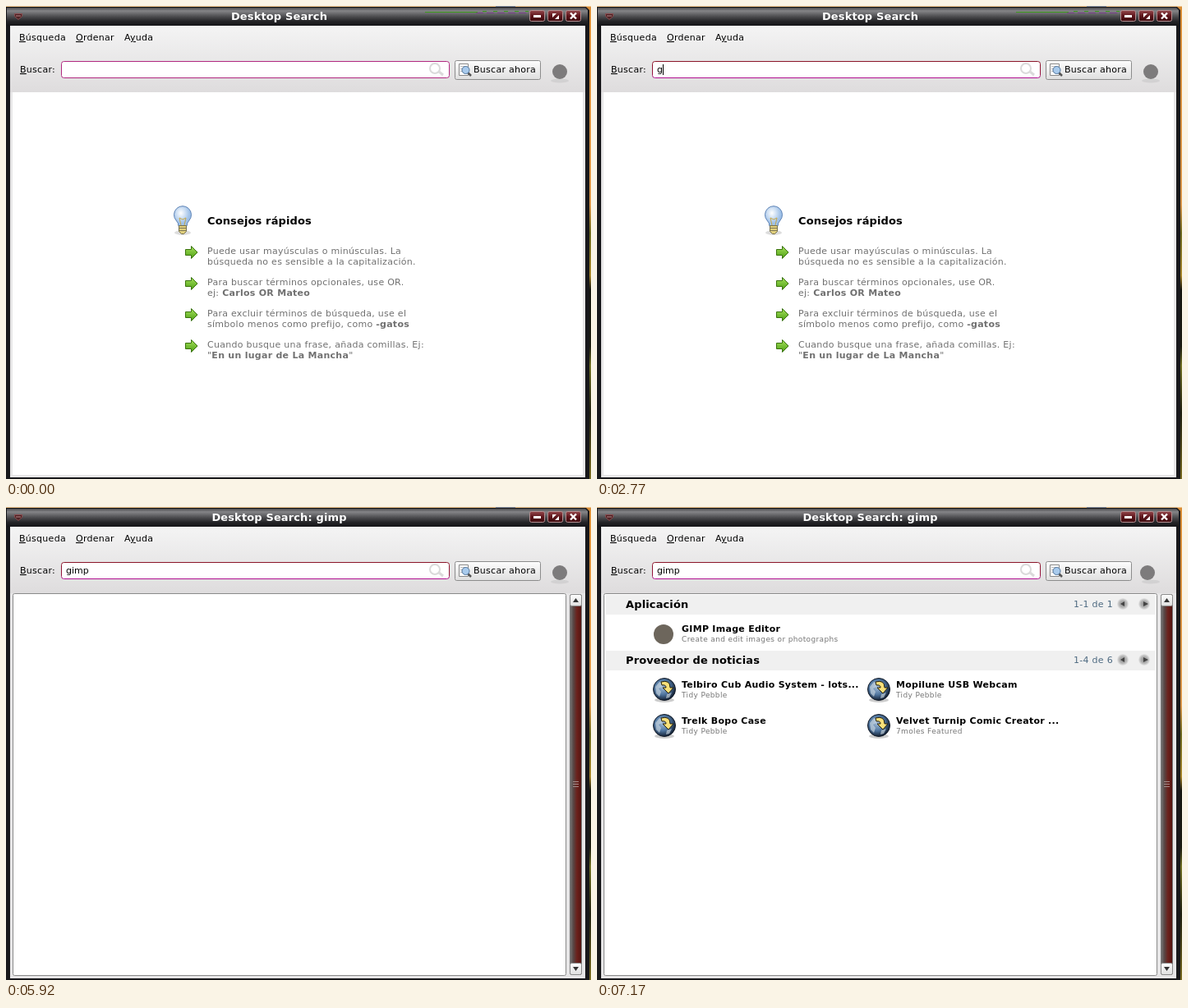
These frames come from a looping animation (712x576 px, 8000 ms). An HTML page:

```html
<!DOCTYPE html>
<html lang="es">
<head>
<meta charset="utf-8">
<title>Desktop Search</title>
<style>
  html, body { margin: 0; width: 100%; height: 100%; overflow: hidden; background: #fff; }
  svg { display: block; }
  text { font: 11px "DejaVu Sans", sans-serif; letter-spacing: .025em; fill: #000; }
  .bold, .bold text { font-weight: bold; }
  .head { font-size: 13px; font-weight: bold; letter-spacing: .01em; }
  .tips text { fill: #707070; }
  .small { font-size: 9px; letter-spacing: .04em; fill: #777; }
  .count { fill: #4d6980; }
  .title { fill: #fff; text-anchor: middle; }
  .key { text-decoration: underline; text-decoration-skip-ink: none; text-underline-offset: 2px; }
  #query { letter-spacing: 0; }
</style>
</head>
<body>
<svg width="712" height="576" viewBox="0 0 712 576">
  <defs>
    <linearGradient id="bar" x2="0" y2="1">
      <stop stop-color="#4a4a4d"/><stop offset=".18" stop-color="#858588"/>
      <stop offset=".5" stop-color="#4b4b4e"/><stop offset=".75" stop-color="#252528"/><stop offset="1" stop-color="#151518"/>
    </linearGradient>
    <linearGradient id="tool" x2="0" y2="1"><stop stop-color="#f4f4f4"/><stop offset="1" stop-color="#dedcdd"/></linearGradient>
    <linearGradient id="button" x2="0" y2="1"><stop stop-color="#fdfdfd"/><stop offset="1" stop-color="#dfdfdf"/></linearGradient>
    <linearGradient id="ruby" x2="0" y2="1"><stop stop-color="#94484c"/><stop offset=".5" stop-color="#5e151b"/><stop offset="1" stop-color="#3c0a0e"/></linearGradient>
    <linearGradient id="focus" x2="0" y2="1"><stop stop-color="#8a1428"/><stop offset=".75" stop-color="#94143c"/><stop offset="1" stop-color="#b01090"/></linearGradient>
    <linearGradient id="wall" x2="0" y2="1">
      <stop stop-color="#d98d35"/><stop offset=".42" stop-color="#d9964a"/><stop offset=".48" stop-color="#6d6a20"/>
      <stop offset=".57" stop-color="#a8862c"/><stop offset=".6" stop-color="#15150d"/><stop offset=".72" stop-color="#1c1c10"/>
      <stop offset=".76" stop-color="#747326"/><stop offset=".86" stop-color="#20200f"/><stop offset="1" stop-color="#7a6c22"/>
    </linearGradient>
    <linearGradient id="thumb"><stop stop-color="#777"/><stop offset=".3" stop-color="#574543"/><stop offset=".6" stop-color="#6c211c"/><stop offset="1" stop-color="#501410"/></linearGradient>
    <linearGradient id="leaf" x2="0" y2="1"><stop stop-color="#a3e05a"/><stop offset="1" stop-color="#4fa015"/></linearGradient>
    <radialGradient id="glass" cx=".4" cy=".35"><stop stop-color="#fff"/><stop offset="1" stop-color="#9fc1e8"/></radialGradient>
    <radialGradient id="sea" cx=".42" cy=".4" r=".62"><stop stop-color="#a3bdd8"/><stop offset=".55" stop-color="#4f759f"/><stop offset="1" stop-color="#101c2e"/></radialGradient>
    <radialGradient id="disc"><stop stop-color="#8c8c8c"/><stop offset=".6" stop-color="#b4b4b4"/><stop offset="1" stop-color="#e6e6e6"/></radialGradient>

    <path id="arrow" d="M.5 4.5h7v-4l7.5 7.5-7.5 7.5v-4h-7z" fill="url(#leaf)" stroke="#39720c"/>
    <g id="globe">
      <ellipse cy="13" rx="12" ry="3" fill="#0003"/>
      <circle r="13.5" fill="url(#sea)" stroke="#121a26"/>
      <path d="M-11-3l5-6 5 1-2 5-4 2 3 4-2 6-4-4zM3 6l6-2-3 6-4 1z" fill="#cdd8e2" opacity=".65"/>
      <path d="M-4-9q11-3 11 7h4L5 5-2-2h4q0-4-5-3z" fill="#f8e07a" stroke="#241e08"/>
    </g>
    <g id="pager">
      <circle cx="640" r="7" fill="url(#disc)"/><path d="M642-3v6l-5-3z" fill="#444"/>
      <circle cx="666" r="7" fill="url(#disc)"/><path d="M665-3v6l6-3z" fill="#444"/>
    </g>
    <rect id="band" x="11" y="107" width="668" height="24" fill="#f0f0f0"/>
    <rect id="winbutton" x=".5" y=".5" width="18" height="13" rx="2" fill="url(#ruby)" stroke="#b48e90"/>
    <rect id="step" x="686.500" y=".5" width="14" height="14" rx="2" fill="url(#button)" stroke="#8b8b8b"/>
  </defs>

  <!-- window frame -->
  <rect width="712" height="576" fill="url(#wall)"/>
  <path d="M0 .5H712" stroke="#efc58e"/>
  <path d="M0 1H706l4 4V576H0z" fill="#18181b"/>
  <path d="M1 2H705l3 3V24H1z" fill="url(#bar)"/>
  <path d="M0 1.500H596" stroke="#111"/>
  <path d="M596 .5h24" stroke="#8890a0"/>
  <g data-show="0-5340">
    <path d="M510 7.500h64" stroke="#3d9a1c"/>
    <path d="M572 8.500h64" stroke="#7b3f8c" stroke-dasharray="9 4"/>
    <path d="M580 6.500h56" stroke="#3d9a1c" stroke-dasharray="5 8"/>
  </g>
  <path d="M10.500 9.500h9v3l-4.500 4-4.500-4z" fill="#4a2224" stroke="#8c4a4d"/>
  <path d="M12 12h6" stroke="#c08588"/>
  <use href="#winbutton" x="637" y="5"/><use href="#winbutton" x="659" y="5"/><use href="#winbutton" x="681" y="5"/>
  <path d="M642 12.500h9" stroke="#fff" stroke-width="3"/>
  <path d="M665 9h5l-5 5zM673 16h-5l5-5z" fill="#fff"/>
  <path d="M687 8.500l7 7m0-7l-7 7" stroke="#fff" stroke-width="2.400"/>
  <text class="head title" x="332.500" y="17" data-show="0-5340">Desktop Search</text>
  <text class="head title" x="332.500" y="17" data-show="5340-8000">Desktop Search: gimp</text>

  <!-- menu and search bar -->
  <rect x="5" y="24" width="700" height="550" fill="#e7e6e7"/>
  <rect x="5" y="24" width="700" height="81" fill="url(#tool)"/>
  <text x="16" y="42"><tspan class="key">B</tspan>úsqueda</text>
  <text x="85" y="42"><tspan class="key">O</tspan>rdenar</text>
  <text x="144" y="42">A<tspan class="key">y</tspan>uda</text>
  <text x="17" y="81"><tspan class="key">B</tspan>uscar:</text>
  <rect id="entry" x="67.500" y="67.500" width="472" height="20" rx="3" fill="#fff"/>
  <g fill="none" stroke="#dadada" stroke-width="2">
    <circle cx="522" cy="76" r="6"/><path d="M527 80l5 4" stroke-width="3"/>
  </g>
  <text id="query" x="73" y="81"></text>
  <rect id="caret" y="71" width="1" height="13"/>

  <rect x="546.500" y="66.500" width="104" height="23" rx="2" fill="url(#button)" stroke="#8c8c8c"/>
  <path d="M551.500 70.500h11v14h-11z" fill="#fff" stroke="#888"/>
  <path d="M553 73.500h7m-7 3h4m-4 3h4" stroke="#bbb"/>
  <path d="M562 81l4 4" stroke="#555" stroke-width="2.500"/>
  <circle cx="559.500" cy="78" r="4.500" fill="#a9cbed" stroke="#50749c"/>
  <text x="569" y="81">Buscar ahora</text>
  <ellipse cx="674" cy="91" rx="11" ry="2.500" fill="#0001"/>
  <circle id="throbber" cy="80" r="9" fill="#7d7b7c"/>

  <!-- quick tips -->
  <g data-show="0-5920">
    <rect x="8" y="105" width="694" height="466" fill="#fff"/>
    <ellipse cx="215" cy="276" rx="10" ry="3" fill="#0002"/>
    <path d="M210 268q0-4-3-7a10.500 10.500 0 1 1 16 0q-3 3-3 7z" fill="url(#glass)" stroke="#5c82b5"/>
    <path d="M213 267l-2-9 4 2 4-2-2 9" fill="none" stroke="#c6a94a"/>
    <path d="M210.500 267.500h9v7l-3 3h-3l-3-3z" fill="#e0cf7c" stroke="#76704c"/>
    <path d="M211 270.500h8m-8 3h8" stroke="#817a57"/>
    <text class="head" x="245" y="266">Consejos rápidos</text>
    <use href="#arrow" x="218" y="292"/><use href="#arrow" x="218" y="330"/>
    <use href="#arrow" x="218" y="368"/><use href="#arrow" x="218" y="406"/>
    <g class="tips">
      <text x="245" y="302">Puede usar mayúsculas o minúsculas. La</text>
      <text x="245" y="315">búsqueda no es sensible a la capitalización.</text>
      <text x="245" y="340">Para buscar términos opcionales, use OR.</text>
      <text x="245" y="353">ej: <tspan class="bold">Carlos OR Mateo</tspan></text>
      <text x="245" y="378">Para excluir términos de búsqueda, use el</text>
      <text x="245" y="391">símbolo menos como prefijo, como <tspan class="bold">-gatos</tspan></text>
      <text x="245" y="416">Cuando busque una frase, añada comillas. Ej:</text>
      <text x="245" y="429">"<tspan class="bold">En un lugar de La Mancha</tspan>"</text>
    </g>
  </g>

  <!-- results -->
  <g data-show="5920-8000">
    <rect x="8.500" y="105.500" width="673" height="465" rx="2" fill="#fff" stroke="#8a8a8a"/>
    <rect x="686.500" y="106.500" width="14" height="463" rx="2" fill="url(#thumb)" stroke="#777"/>
    <use href="#step" y="106"/><use href="#step" y="555"/>
    <path d="M690 116h7l-3.500-5zM690 560h7l-3.500 5z" fill="#333"/>
    <path d="M690 334.500h7m-7 3h7m-7 3h7" stroke="#a58a88"/>
  </g>
  <g data-show="6910-8000">
    <use href="#band"/><use href="#pager" y="118"/>
    <text class="head" x="35" y="123">Aplicación</text>
    <text class="count" x="580" y="122">1-1 de 1</text>
    <circle cx="81" cy="155" r="12" fill="#6d665c"/>
    <text class="bold" x="103" y="152">GIMP Image Editor</text>
    <text class="small" x="103" y="164">Create and edit images or photographs</text>
  </g>
  <g id="news" data-show="6330-8000">
    <use href="#band"/>
    <g data-show="6590-8000">
      <use href="#pager" y="118"/>
      <text class="head" x="35" y="123">Proveedor de noticias</text>
      <text class="count" x="580" y="122">1-4 de 6</text>
      <use href="#globe" x="82" y="154"/><use href="#globe" x="343" y="154"/>
      <use href="#globe" x="82" y="198"/><use href="#globe" x="343" y="198"/>
      <g class="bold">
        <text x="103" y="152">Telbiro Cub Audio System - lots...</text>
        <text x="364" y="152">Mopilune USB Webcam</text>
        <text x="103" y="196">Trelk Bopo Case</text>
        <text x="364" y="196">Velvet Turnip Comic Creator ...</text>
      </g>
      <text class="small" x="103" y="164">Tidy Pebble</text>
      <text class="small" x="364" y="164">Tidy Pebble</text>
      <text class="small" x="103" y="208">Tidy Pebble</text>
      <text class="small" x="364" y="208">7moles Featured</text>
    </g>
  </g>

  <g data-show="1100-1500">
    <rect x="53.500" y="107.500" width="196" height="20" fill="#f7f5bd" stroke="#000"/>
    <text x="58" y="121">Teclee los términos de búsqueda</text>
  </g>
</svg>
<script>
  const LOOP = 8000;
  const KEY_TIMES = [2770, 3030, 3300, 3550];
  const CARET_X = [73, 80, 83, 94, 101];
  const CARET_ON = [[990, 1780], [2190, 5920], [6210, 6910]];
  const THROB_TIMES = [5980, 6100, 6210, 6330, 6590, 6670, 6910, 7170];

  const byId = id => document.getElementById(id);
  const [entry, query, caret, throbber, news] =
    ['entry', 'query', 'caret', 'throbber', 'news'].map(byId);
  const within = (t, [from, to]) => t >= from && t < to;
  const countPast = (t, times) => times.filter(time => t >= time).length;
  const timed = [...document.querySelectorAll('[data-show]')]
    .map(node => ({ node, span: node.dataset.show.split('-').map(Number) }));

  function draw(t) {
    for (const { node, span } of timed) node.style.display = within(t, span) ? '' : 'none';

    const typed = countPast(t, KEY_TIMES);
    query.textContent = 'gimp'.slice(0, typed);
    caret.setAttribute('x', CARET_X[typed]);
    caret.style.display = CARET_ON.some(span => within(t, span)) ? '' : 'none';
    entry.setAttribute('stroke', t < 590 ? '#b0287f' : 'url(#focus)');

    const turns = countPast(t, THROB_TIMES);
    throbber.setAttribute('cx', turns ? 670 + turns % 2 * 2 : 674);
    news.setAttribute('transform', `translate(0 ${t < 6910 ? 0 : 68})`);
  }

  const start = performance.now();
  function tick() {
    draw((performance.now() - start) % LOOP);
    requestAnimationFrame(tick);
  }
  tick();
</script>
</body>
</html>
```
